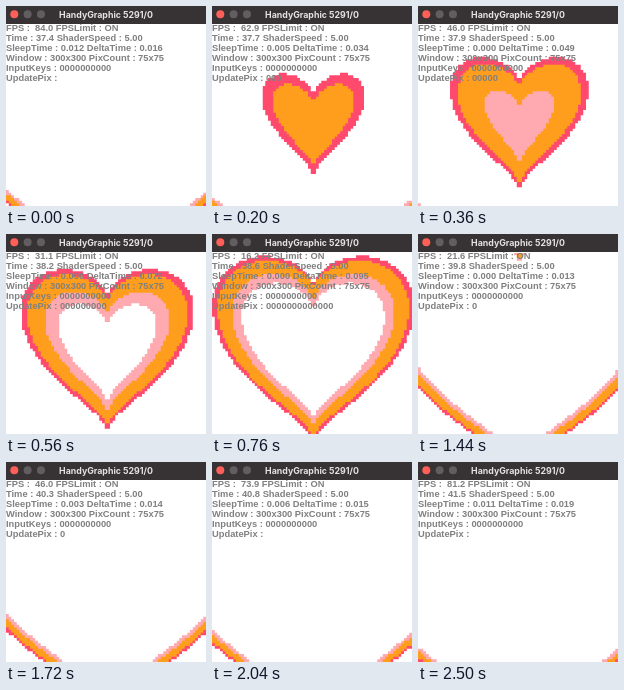
Recreate the animation shown at these times as an HTML page with a canvas. Size 200 px wide and 200 px high, loop 2600 ms.

```html
<!DOCTYPE html>
<html lang="en">
<head>
<meta charset="utf-8">
<title>Heart shader</title>
<style>
  html, body { margin: 0; width: 100%; height: 100%; overflow: hidden; background: #fff; }
  canvas { display: block; width: 200px; height: 200px; }
</style>
</head>
<body>
<canvas id="stage" width="200" height="200"></canvas>
<script>
const ctx = document.getElementById('stage').getContext('2d');

const LOOP = 2600, STEP = 40, LAST = 2500;
const CELLS = 75, CELL = 200 / CELLS, BAR = 56 / 3;
const CENTER = { x: 101.33, y: 133.5 };

// Hearts grow in squared radius at a steady rate of the program's own clock.
const RATE = 8550, PERIOD = 35000;
// Bands from the outer edge inwards, as depths in squared radius.
const BANDS = [[1000, '#ff4a6e'], [3600, '#ff9d1c'], [5100, '#ffa9b1']];

const KEYS   = [0, 360, 760, 1080, 1440, 2040, 2500];
const FPS    = [84, 46, 16.2, 10.6, 21.6, 73.9, 81.5];
const CLOCK  = [37.37, 37.93, 38.56, 39.06, 39.83, 40.84, 41.56];
const SLEEP  = [0.012, 0, 0, 0, 0, 0.006, 0.011];
const DELTA  = [0.016, 0.049, 0.095, 0.071, 0.013, 0.015, 0.019];
const UPDATE = [0, 5, 13, 8, 1, 0, 0];

// The window's 300 px drawing area, shown scaled down to the stage.
const view = document.createElement('canvas');
view.width = view.height = 300;
const pix = view.getContext('2d');

function at(values, t) {
  let i = 1;
  while (i < KEYS.length - 1 && t > KEYS[i]) i++;
  const u = (t - KEYS[i - 1]) / (KEYS[i] - KEYS[i - 1]);
  return values[i - 1] + (values[i] - values[i - 1]) * u;
}

// Squared heart radius: x² + s²(y - k√|x|)², with y pointing up.
function heart(px, py) {
  const x = Math.abs(px - CENTER.x);
  const y = CENTER.y - py;
  return x * x + 1.626 * (y - 6 * Math.sqrt(x)) ** 2;
}

function bandColor(depth) {
  if (depth <= 0) return null;
  const band = BANDS.find(([limit]) => depth < limit);
  return band ? band[1] : null;
}

function drawHearts(level) {
  pix.fillStyle = '#fff';
  pix.fillRect(0, 0, 300, 300);
  for (let row = 0; row < CELLS; row++) {
    for (let col = 0; col < CELLS; col++) {
      const r2 = heart((col + 0.5) * CELL, BAR + (row + 0.5) * CELL);
      const color = bandColor(level - r2) || bandColor(level + PERIOD - r2);
      if (!color) continue;
      pix.fillStyle = color;
      pix.fillRect(col * 4, row * 4, 4, 4);
    }
  }
  ctx.imageSmoothingQuality = 'high';
  ctx.drawImage(view, 0, BAR, 200, 200);
}

function drawStatus(t) {
  const lines = [
    `FPS : ${at(FPS, t).toFixed(1).padStart(5)} FPSLimit : ON`,
    `Time : ${at(CLOCK, t).toFixed(1)} ShaderSpeed : 5.00`,
    `SleepTime : ${at(SLEEP, t).toFixed(3)} DeltaTime : ${at(DELTA, t).toFixed(3)}`,
    'Window : 300x300 PixCount : 75x75',
    'InputKeys : 0000000000',
    `UpdatePix : ${'0'.repeat(Math.round(at(UPDATE, t)))}`
  ];
  ctx.font = 'bold 9.33px "Liberation Sans", Arial, sans-serif';
  ctx.textAlign = 'left';
  ctx.fillStyle = '#808080';
  lines.forEach((line, i) => ctx.fillText(line, 0, 25.3 + i * 10));
}

function drawTitleBar() {
  ctx.fillStyle = '#373234';
  ctx.fillRect(0, 0, 200, 18);
  ['#ff5f57', '#625e60', '#625e60'].forEach((color, i) => {
    ctx.fillStyle = color;
    ctx.beginPath();
    ctx.arc(8.3 + i * 13.33, 8.3, 4, 0, Math.PI * 2);
    ctx.fill();
  });
  ctx.font = 'bold 8.8px Inter, sans-serif';
  ctx.textAlign = 'center';
  ctx.fillStyle = '#e4e2e3';
  ctx.fillText('HandyGraphic 5291/0', 100, 12);
}

function render(now) {
  const t = Math.min(LAST, Math.floor((now % LOOP) / STEP) * STEP);
  ctx.fillStyle = '#fff';
  ctx.fillRect(0, 0, 200, 200);
  drawHearts(RATE * (at(CLOCK, t) - CLOCK[0]));
  drawStatus(t);
  drawTitleBar();
}

const start = performance.now();
function tick() {
  render(performance.now() - start);
  requestAnimationFrame(tick);
}
tick();
</script>
</body>
</html>
```
